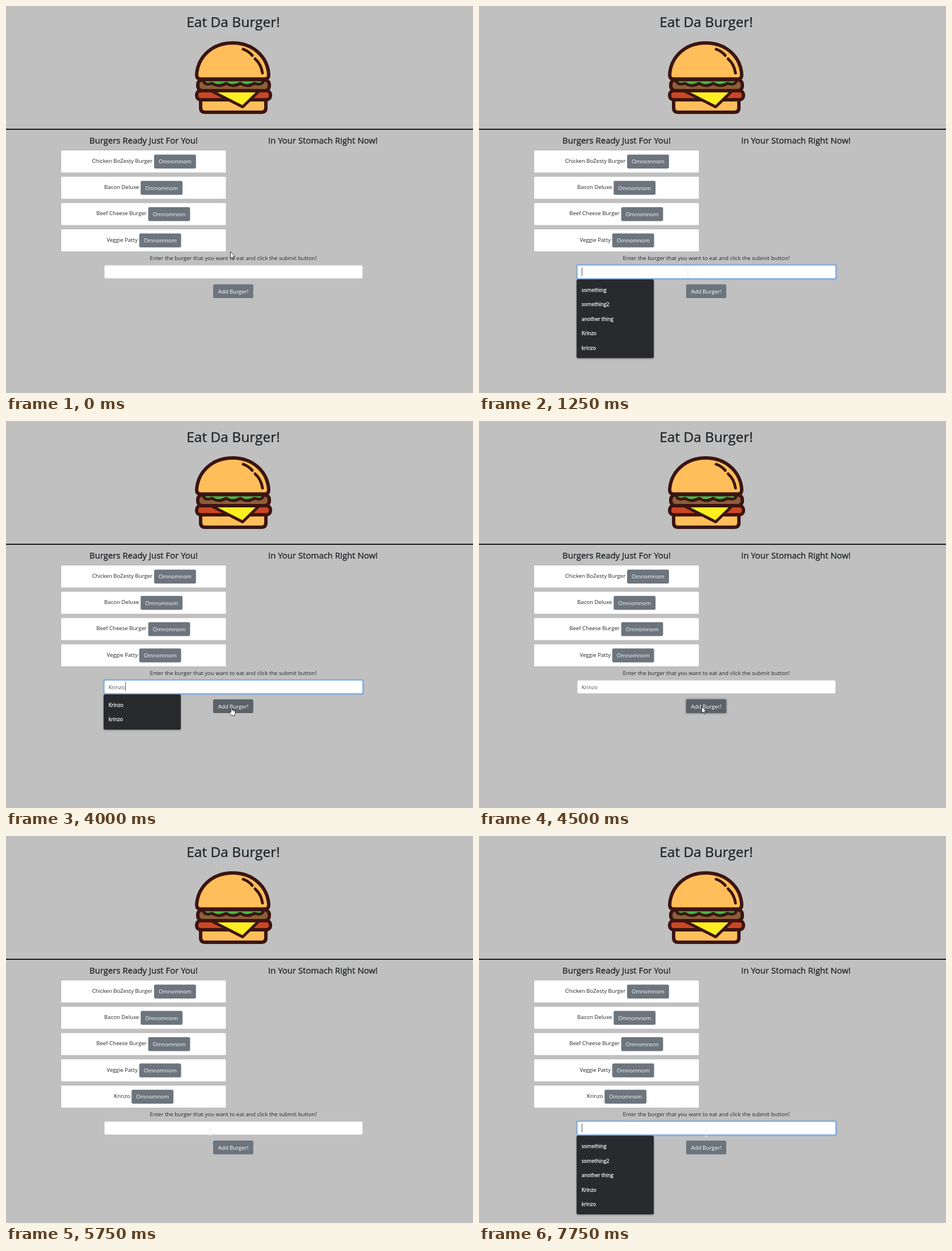
These frames come from a looping animation (823x681 px, 8000 ms). An HTML page:

```html
<!DOCTYPE html>
<html lang="en">
<head>
<meta charset="utf-8">
<title>Eat Da Burger!</title>
<style>
  html, body { margin: 0; width: 100%; height: 100%; overflow: hidden; background: #c0c0c0; }
  svg { display: block; width: 100vw; height: 100vh; font: 9.65px "Open Sans", "Noto Sans", sans-serif; fill: #212529; }
  .title { font-size: 24.5px; stroke: #212529; stroke-width: .4; }
  .head { font-size: 14.95px; stroke: #212529; stroke-width: .35; }
  .mid { text-anchor: middle; }
  .end { text-anchor: end; }
  .light { fill: #fff; }
  .typed { fill: #495057; }
  .option { font-size: 8.85px; fill: #f1f2f4; stroke: #f1f2f4; stroke-width: .3; }
  .menu { filter: drop-shadow(0 1px 1.5px #0006); }
  .burger { stroke: #3b1512; stroke-width: 6; stroke-linejoin: round; stroke-linecap: round; }
</style>
</head>
<body>
<svg viewBox="0 0 823 681">
  <text class="title mid" x="400.5" y="37">Eat Da Burger!</text>
  <g class="burger">
    <rect x="338" y="130" width="126" height="19" rx="8" fill="#8c5f3a"/>
    <path d="M347 130Q350 141 363 136Q375 144 388 136Q400 144 413 136Q425 144 438 136Q452 141 454 130Z" fill="#4ab747" stroke-width="5"/>
    <path d="M343 128.5Q336 128.5 336 121C338 89 364 65 399.5 65S461 89 463 121Q463 128.5 456 128.5Z" fill="#ffbe59"/>
    <path d="M418 76Q427 79 434 87M439 93Q450 103 452 118" fill="none" stroke-width="5"/>
    <path d="M343 165H458V179Q458 187 450 187H351Q343 187 343 179Z" fill="#ffbe59"/>
    <rect x="336" y="149" width="130" height="16" rx="7" fill="#cb4724"/>
    <path d="M362 149.500L417 177.500L446 149.500Z" fill="#ffee20" stroke-width="5"/>
  </g>
  <path d="M0 216h823v1.700H0z" fill="#000"/>
  <text class="head mid" x="242.500" y="242">Burgers Ready Just For You!</text>
  <text class="head mid" x="558.500" y="242">In Your Stomach Right Now!</text>
  <g id="view"></g>
</svg>
<script>
const view = document.getElementById('view');

// Each burger with the left edge of its button
const burgers = [
  ['Chicken BoZesty Burger', 261],
  ['Bacon Deluxe', 237.3],
  ['Beef Cheese Burger', 250.6],
  ['Veggie Patty', 234.8],
  ['Krinzo', 221.3]
];
const shortMenu = ['Krinzo', 'krinzo'];
const fullMenu = ['something', 'something2', 'another thing', ...shortMenu];

// Every step changes only the listed parts of the state
const steps = [
  [0, { count: 4, typed: '', focus: false, caret: false, menu: [], button: '', cursor: ['arrow', 395, 432] }],
  [250, { cursor: ['arrow', 363.5, 453] }],
  [500, { cursor: ['beam', 368, 471] }],
  [1000, { focus: true, caret: true, menu: fullMenu }],
  [1500, { caret: false }],
  [2000, { typed: 'K', caret: true, menu: shortMenu }],
  [2250, { typed: 'Kr' }],
  [2500, { typed: 'Krin' }],
  [2750, { typed: 'Krinz' }],
  [3000, { typed: 'Krinzo' }],
  [3500, { caret: false }],
  [3750, { cursor: ['arrow', 384, 490] }],
  [4000, { caret: true, button: 'hover', cursor: ['hand', 393, 503] }],
  [4500, { focus: false, caret: false, menu: [], button: 'focus', cursor: ['arrow', 392, 502] }],
  [4750, { count: 5, typed: '', button: '', cursor: ['hand', 393, 503] }],
  [5250, { cursor: ['arrow', 353, 499] }],
  [5500, { cursor: ['beam', 360, 518] }],
  [5750, { cursor: ['beam', 360, 520.5] }],
  [6750, { focus: true, caret: true, menu: fullMenu }],
  [7000, { cursor: ['beam', 400, 523] }],
  [7250, { caret: false }],
  [7750, { caret: true }]
];

const cursors = {
  arrow: '<path d="M.5.5V12.300L3.200 9.800L5 13.700L6.800 12.900L5 9.200H8.700Z" fill="#fff" stroke="#000" stroke-width=".8"/>',
  beam: '<path d="M-2.500-6H2.500M0-6V6M-2.500 6H2.500" fill="none" stroke="#e6e6e6" stroke-width=".9"/>',
  hand: '<path d="M3.300 10V1.800Q4.300 0 5.300 1.800V6Q7.200 5.200 7.600 6.500Q9.300 6 9.500 7.300Q11 7 11 8.500V11.500L9.700 15.500H4.300L.7 10.500Q.3 8.500 2 9Z" fill="#fff" stroke="#000" stroke-width=".8" stroke-linejoin="round"/>'
};

const box = (x, y, w, h, fill, extra = '') =>
  `<rect x="${x}" y="${y}" width="${w}" height="${h}" fill="${fill}" ${extra}/>`;
const text = (x, y, str, cls = '') => `<text x="${x}" y="${y}" class="${cls}">${str}</text>`;

function burgerRow([name, x], i) {
  const y = 254 + i * 46.25;
  return box(97, y, 290.7, 39.3, '#fff', 'rx="1.5" stroke="#0002" stroke-width=".7"')
    + text(x - 2.8, y + 21.8, name, 'end')
    + box(x, y + 7.6, 73.8, 24.3, '#6c757d', 'rx="2.6"')
    + text(x + 36.9, y + 23.4, 'Omnomnom', 'light mid');
}

function form({ typed, focus, button, menu }) {
  const ring = focus ? 'stroke="#80b4ee" stroke-width="1"' : 'stroke="#ced4da" stroke-width=".7"';
  const glow = focus ? box(171, 454, 460, 28, '#8fafd5', 'rx="4"') : '';
  const halo = button === 'focus' ? box(363, 487.7, 74.8, 28.6, '#a1a5a9', 'rx="4"') : '';
  const options = menu.map((word, i) => text(180.7, 502.800 + i * 25.5, word, 'option')).join('');
  const list = menu.length
    ? `<g class="menu">${box(172, 481, 136, 11 + menu.length * 25.5, '#292a2d', 'rx="2.5"')}</g>` + options
    : '';
  return text(400.5, 447, 'Enter the burger that you want to eat and click the submit button!', 'mid')
    + glow + box(173.3, 456.3, 455, 23, '#fff', 'rx="2.6" ' + ring)
    + text(180.7, 471.500, typed, 'typed')
    + halo + box(365, 489.7, 70.800, 24.3, button ? '#5a6268' : '#6c757d', 'rx="2.6"')
    + text(400.5, 505.700, 'Add Burger!', 'light mid') + list;
}

function render(state) {
  const [kind, x, y] = state.cursor;
  const shift = (state.count - 4) * 46.25;
  view.innerHTML = burgers.slice(0, state.count).map(burgerRow).join('')
    + `<g id="form" transform="translate(0 ${shift})">${form(state)}</g>`
    + `<g transform="translate(${x} ${y})">${cursors[kind]}</g>`;
  if (state.caret) {
    const end = view.querySelector('.typed').getComputedTextLength();
    document.getElementById('form').innerHTML += box(Math.round(181 + end), 460, 1, 15, '#495057');
  }
}

let shown = -1;
function tick() {
  const time = performance.now() % 8000;
  const count = steps.filter(([start]) => start <= time).length;
  if (count !== shown) {
    shown = count;
    render(Object.assign({}, ...steps.slice(0, count).map(step => step[1])));
  }
  requestAnimationFrame(tick);
}
tick();
</script>
</body>
</html>
```
